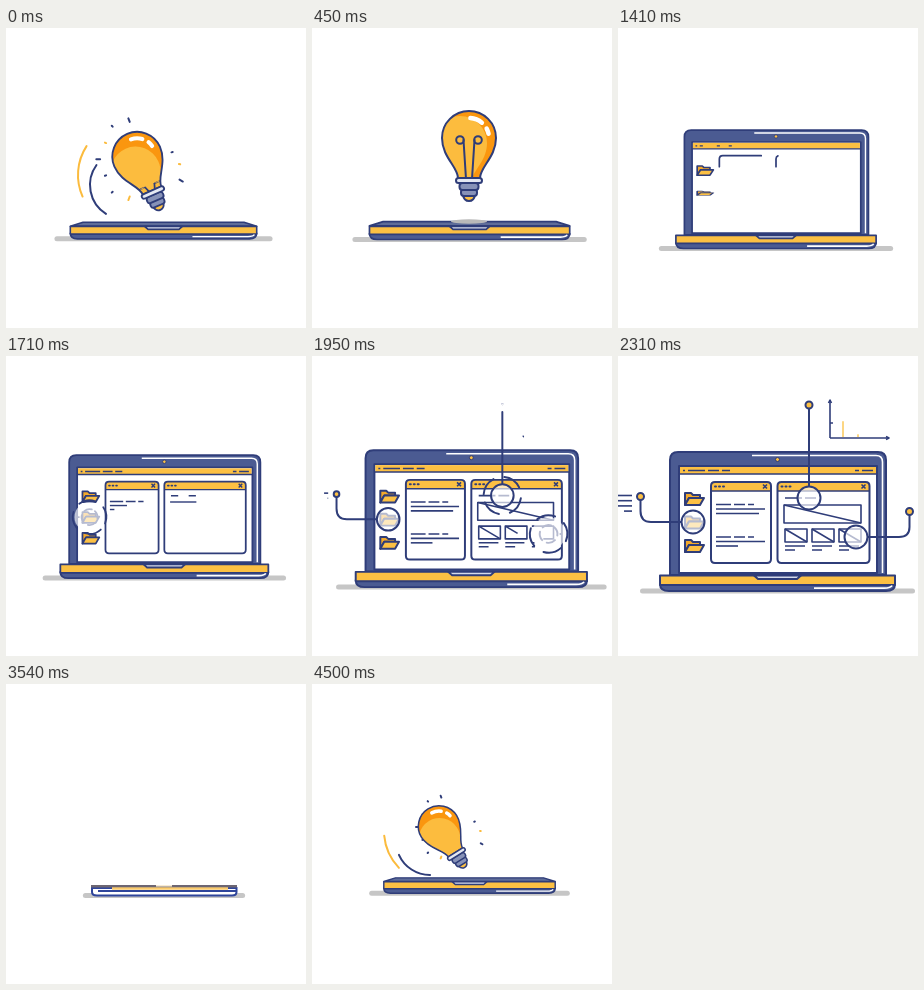
Recreate the animation shown at these times as an HTML page. Size 300 px wide and 300 px high, loop 4.53 s.

```html
<!DOCTYPE html>
<html lang="en">
<head>
<meta charset="utf-8">
<title>Idea to laptop</title>
<style>
html, body { margin: 0; width: 100%; height: 100%; overflow: hidden; background: #fff; }
svg { display: block; width: 100vw; height: 100vh; }
.ln { fill: none; stroke: #2f3d79; stroke-width: 2; stroke-linecap: round; stroke-linejoin: round; }
.box { stroke: #2f3d79; stroke-width: 2; stroke-linejoin: round; }
.thin { stroke-width: 1.6; stroke-linecap: butt; }
.gold { stroke: #fbbb3d; }
.y { fill: #fcc043; }
.n { fill: #4b5b92; }
.w { fill: #fff; }
</style>
</head>
<body>
<svg id="stage" viewBox="0 0 300 300">
  <defs>
    <path id="glass" d="M-11 40C-11 29-27 19-27 0A27 27 0 0 1 27 0C27 19 11 29 11 40Z"/>
    <clipPath id="glassClip"><use href="#glass"/></clipPath>
    <clipPath id="aboveBase"><rect width="300" height="205"/></clipPath>
    <g id="folder">
      <path class="box" fill="#f3a92b" d="M1 13V1H7L9 3H16V6H5Z"/>
      <path class="box y" d="M1 13L5 6H20L16 13Z"/>
    </g>
  </defs>
  <rect id="floor" height="5" rx="2.5" fill="#c6c6c6"/>
  <g id="laptop">
    <g id="lid">
      <path class="box n" d="M52 219V104Q52 96 60 96H260Q268 96 268 104V219Z"/>
      <path d="M134 99.5H258Q264.5 99.5 264.5 106V217" fill="none" stroke="#fff" stroke-width="1.6"/>
      <rect class="box w" x="61" y="110" width="198" height="107"/>
      <circle class="box y" cx="159.5" cy="103.5" r="2" style="stroke-width:1"/>
      <g id="screen">
        <rect class="y" x="62" y="111" width="196" height="7"/>
        <path class="ln thin" d="M61 118H259"/>
      </g>
    </g>
    <path id="flap" class="box w" d="M42 215H277L266 220H53Z"/>
    <path id="cover" class="box" fill="#5f6d99" d="M42 219L58 214H261L277 219Z"/>
    <g id="base">
      <path class="box n" d="M42 228H277Q277 235 268 235H51Q42 235 42 228Z"/>
      <path class="box y" d="M42 219.5H277V229H42Z"/>
      <path class="box" fill="#d5daea" d="M136 219.5H183L179 223H140Z"/>
      <path d="M196 232.2H266Q273 232 274 229.5" fill="none" stroke="#fff" stroke-width="1.8"/>
    </g>
    <g id="notes"></g>
  </g>
  <g id="flat">
    <path d="M86 204V208Q86 211.5 91 211.5H226Q230.5 211.5 230.5 208V204Z" fill="#fff" stroke="#2f459b" stroke-width="2"/>
    <path d="M92 207H230" stroke="#2f459b" stroke-width="2"/>
    <path d="M85 202.3H231" stroke="#6d6672" stroke-width="2.4"/>
    <path d="M106 204.5H222" stroke="#fbcb6b" stroke-width="2.6"/>
    <path d="M150 201.8H166" stroke="#fff3d8" stroke-width="1.5"/>
  </g>
  <ellipse id="shade" cx="157" cy="193.5" rx="18" ry="2.2" fill="#b9b9b9"/>
  <g id="burst"></g>
  <g clip-path="url(#aboveBase)">
    <g id="bulb">
      <g clip-path="url(#glassClip)">
        <use href="#glass" fill="#fa960f"/>
        <use id="glow" href="#glass" fill="#fcbc3e"/>
        <g id="wire" class="ln">
          <path d="M-3 41L-5.500 2M3 41L5.500 2"/>
          <circle cx="-9" cy="2" r="3.800"/><circle cx="9" cy="2" r="3.800"/>
        </g>
        <path id="shine" fill="none" stroke="#fff" stroke-width="4.500" stroke-linecap="round"/>
      </g>
      <use href="#glass" class="ln"/>
      <path class="box y" d="M-6 57H6Q5 63 0 63T-6 57Z"/>
      <rect class="box" fill="#8792b8" x="-8" y="51" width="16" height="7" rx="3"/>
      <rect class="box" fill="#8792b8" x="-9.500" y="45" width="19" height="7" rx="3"/>
      <rect class="box" fill="#e4e8f2" x="-13" y="40" width="26" height="5" rx="2.500"/>
    </g>
  </g>
</svg>
<script>
const LOOP = 4530, POP = 4350, STEP = 30, RETRACT = 2760;
const $ = id => document.getElementById(id);
const clamp = x => Math.max(0, Math.min(1, x));
const mix = (a, b, p) => a + (b - a) * p;

// Eased 0..1 between two times
function ramp(t, from, to) {
  const x = clamp((t - from) / (to - from));
  return x * x * (3 - 2 * x);
}
// Rises and returns to zero between two times
const bump = (t, from, to) => Math.sin(Math.PI * clamp((t - from) / (to - from)));

function set(node, attrs) {
  for (const k in attrs) node.setAttribute(k, attrs[k]);
  return node;
}
function add(parent, tag, attrs) {
  const node = document.createElementNS('http://www.w3.org/2000/svg', tag);
  parent.appendChild(node);
  return set(node, attrs);
}
const show = (node, on) => node.style.display = on ? '' : 'none';

function polar(cx, cy, r, deg) {
  const a = deg * Math.PI / 180;
  return [cx + r * Math.cos(a), cy + r * Math.sin(a)];
}
const arc = (cx, cy, r, a, b) =>
  `M${polar(cx, cy, r, a)}A${r} ${r} 0 ${b - a > 180 ? 1 : 0} 1 ${polar(cx, cy, r, b)}`;

// Lines that draw themselves; those outside the screen also retract
const strokes = [];
function stroke(parent, d, start, time, cls = '') {
  const node = add(parent, 'path', { class: 'ln ' + cls, d, pathLength: 1 });
  strokes.push({ node, start, end: start + time, retracts: parent === notes });
}
function drawStrokes(t) {
  for (const s of strokes) {
    const p = ramp(t, s.start, s.end) * (s.retracts ? 1 - ramp(t, RETRACT, RETRACT + 150) : 1);
    show(s.node, p > 0);
    set(s.node, { 'stroke-dasharray': p + ' 2' });
  }
}
// A row of dashes with even gaps
function dashes(x, y, ...widths) {
  return widths.map(w => {
    const d = `M${x} ${y}h${w}`;
    x += w + 3;
    return d;
  }).join('');
}

const screen = $('screen'), notes = $('notes');

stroke(screen, dashes(65, 114.500, 2, 17, 11, 8), 1360, 260, 'thin');
stroke(screen, dashes(237, 114.500, 4, 11), 1500, 180, 'thin');

const folders = [0, 1, 2].map(i => ({
  y: 149 + 23.500 * i, start: 1290 + 55 * i,
  node: add(screen, 'use', { href: '#folder' })
}));

const heads = [];
function makeWindow(x, w, start) {
  const r = x + w, top = `V130q0 -4 4 -4H${r - 4}q4 0 4 4`;
  heads.push({ node: add(screen, 'path', { class: 'y', d: `M${x} 135${top}V135Z` }), start: start + 170 });
  stroke(screen, `M${x} 139${top}V203q0 4 -4 4H${x + 4}q-4 0 -4 -4V139`, start, 330);
  stroke(screen, `M${x} 135H${r}`, start + 170, 160, 'thin');
  stroke(screen, dashes(x + 4, 130.500, 1, 1, 1), start + 200, 120);
  stroke(screen, `M${r - 8} 128.500l4 4m0 -4l-4 4`, start + 240, 100, 'thin');
}
makeWindow(93, 60, 1310);
makeWindow(159.500, 92, 1370);

for (const i of [0, 1]) {
  const y = 148.500 + 32.500 * i, start = 1620 + 90 * i;
  stroke(screen, dashes(98, y, 15, 11, 6), start, 140, 'thin');
  stroke(screen, dashes(98, y + 4.500, 49), start + 30, 140, 'thin');
  stroke(screen, dashes(98, y + 9, 43 - 21 * i), start + 60, 140, 'thin');
}
stroke(screen, dashes(167, 142, 17, 11), 1660, 140, 'thin');
stroke(screen, 'M166 149H243V167H166Z', 1660, 200, 'thin');
stroke(screen, 'M166 149L243 167', 1770, 150, 'thin');
for (let i = 0; i < 3; i++) {
  const x = 167 + 27 * i, start = 1740 + 60 * i;
  stroke(screen, `M${x} 173h22v13h-22z`, start, 150, 'thin');
  stroke(screen, `M${x} 173l22 13`, start + 90, 110, 'thin');
  stroke(screen, dashes(x, 190, 20) + dashes(x, 194, 10), start + 60, 150, 'thin');
}

// Magnifiers with leader lines ending in a knob
function makeLens(x, y, start, leader, knobX, knobY) {
  stroke(notes, leader, start + 50, 220);
  const circle = (cls, cx, cy) => add(notes, 'circle', { class: cls, cx, cy });
  return {
    x, y, start,
    rings: [19, 9].map(r => set(circle('ln', x, y), { r, 'stroke-dasharray': `${r} ${r * .6}` })),
    disc: set(circle('box w', x, y), { 'fill-opacity': .65 }),
    knob: circle('box y', knobX, knobY)
  };
}
const lenses = [
  makeLens(75, 166, 1650, 'M63 166H33Q22.500 166 22.500 155V141', 22.500, 140.500),
  makeLens(191, 142, 1720, 'M191 130V50', 191, 49),
  makeLens(238, 181, 1890, 'M250 181H281Q291.500 181 291.500 171V156', 291.500, 155.500)
];

// Side paragraph and chart
for (let i = 0; i < 4; i++) stroke(notes, `M14 ${139.500 + 5.200 * i}H${i < 3 ? -2 : 6}`, 1890 + 40 * i, 180, 'thin');
stroke(notes, 'M212 82V45', 1930, 220, 'thin');
stroke(notes, 'M212 82H270', 1930, 250, 'thin');
stroke(notes, 'M210.500 47l1.500 -3l1.500 3M268 80.500l3 1.500l-3 1.500M212 67h3', 2130, 90, 'thin');
const bars = [0, 1, 2].map(i => ({
  x: 225 + 15 * i, h: 26 * Math.cos(i) ** 2 + 6 * i, start: 2190 + 60 * i,
  node: add(notes, 'rect', { fill: '#fcc95b' })
}));

// Sparks: seven fan out on the left of the bulb, three on the right
const sparks = Array.from({ length: 10 }, (_, i) => {
  const j = i - 7;
  const angle = j < 0 ? 111 + 23 * i : -14 + 22 * j;
  const [x, y] = polar(138, 131, j < 0 ? 42 + 4 * (i % 2) : 29 + 7 * j, angle);
  const node = add($('burst'), 'path', { class: 'ln ' + (i % 4 ? '' : 'gold') });
  return { x, y, angle, len: i % 3 ? 1.500 : 4.500, node };
});
// Arcs sweeping around the bulb; angles and speeds of both ends
const swooshes = [
  { circle: [125, 147, 53], tail: 156, head: 213, slow: .67, fast: 1.270, cls: 'ln gold' },
  { circle: [118, 157, 34], tail: 122, head: 216, slow: 1.070, fast: 2, cls: 'ln' }
];
for (const s of swooshes) s.node = add($('burst'), 'path', { class: s.cls });

set($('shine'), { d: arc(0, 0, 20, -86, -50) + arc(0, 0, 20, -28, -12) });

function drawLaptop(t) {
  const grow = ramp(t, -106, 52), zoom = ramp(t, 1560, 2050), drop = ramp(t, 1600, 2130);
  const shrink = ramp(t, 2900, 3240), rise = ramp(t, 4080, POP);
  const s = .62 + .232 * grow + .148 * zoom - .41 * shrink + .03 * rise;
  const y = 209 + 2.500 * ramp(t, -40, 20) + 4.500 * ramp(t, 540, 870) + 4.500 * ramp(t, 1020, 1080)
    + 14.500 * drop - 23.500 * shrink - 2.500 * rise;
  const x = 157.500 + .5 * ramp(t, 300, 870) + 1.500 * (zoom - shrink) - .5 * rise;
  const hop = -10 * bump(t, 4080, POP);
  const flat = t >= 3240 && t < 3810;

  set($('floor'), { x: x - 137.500 * s, y: y - 2.500, width: 275 * s });
  set($('laptop'), { transform: `translate(${x} ${y + hop}) scale(${s}) translate(-159.500 -235)` });
  show($('laptop'), !flat);
  show($('flat'), flat);

  const open = .08 * ramp(t, 780, 840) + .92 * ramp(t, 1020, 1290) - ramp(t, 2940, 3180);
  show($('lid'), open > .1);
  show($('flap'), open > .001 && open <= .1);
  show($('cover'), open <= .001);
  set($('lid'), { transform: `translate(159.500 219) scale(${1 + .075 * (1 - open)} ${open}) translate(-159.500 -219)` });
}

function drawScreen(t) {
  for (const f of folders) {
    const p = ramp(t, f.start, f.start + 150);
    show(f.node, p > 0);
    set(f.node, { transform: `translate(66 ${f.y}) scale(1 ${p}) translate(0 -13)` });
  }
  for (const h of heads) set(h.node, { opacity: ramp(t, h.start, h.start + 120) });
  for (const b of bars) {
    const h = b.h * ramp(t, b.start, b.start + 210) * (1 - ramp(t, RETRACT, RETRACT + 120));
    const width = mix(1.500, 6, ramp(t, 2340, 2520));
    set(b.node, { x: b.x - width / 2, y: 81 - h, width, height: h });
  }
  drawStrokes(t);
  lenses.forEach(l => drawLens(l, t - l.start, t));
}

function drawLens(l, age, t) {
  const settle = ramp(age, 60, 190), r = mix(17, 11.500, settle) * (1 - ramp(t, RETRACT + 90, RETRACT + 200));
  const knob = 3.500 * ramp(age, 220, 330) * (1 - ramp(t, RETRACT, RETRACT + 90));
  show(l.disc, age > 0 && r > 0);
  show(l.knob, knob > 0);
  set(l.disc, { r, 'stroke-opacity': settle });
  set(l.knob, { r: knob });
  l.rings.forEach((ring, i) => {
    show(ring, age > 0 && age < (i ? 120 : 250));
    set(ring, { transform: `rotate(${age * (i ? -.8 : .8)} ${l.x} ${l.y})` });
  });
}

function drawBulb(t) {
  const on = t > -150 && t < 1100;
  show($('bulb'), on);
  show($('shade'), on);
  set($('shade'), { opacity: ramp(t, 240, 420) * (1 - ramp(t, 960, 1050)) });
  const s = ramp(t, -177, 37), fall = clamp((t - 930) / 165);
  const x = 152 + 5 * ramp(t, -60, 60);
  const y = 191 - 10 * s - 16 * bump(t, 0, 540) + 5.500 * ramp(t, 540, 870) + 75 * fall * fall;
  const tilt = -36 * (1 - ramp(t, -62, 96));
  const turn = ramp(t, 0, 240), wire = ramp(t, -30, 80);
  set($('bulb'), { transform: `translate(${x} ${y}) rotate(${tilt}) scale(${s}) translate(0 -63)` });
  set($('glow'), { transform: `translate(${mix(-8, -9, turn)} ${mix(14, 5, turn)})` });
  set($('wire'), { transform: `translate(0 41) scale(1 ${wire}) translate(0 -41)` });
  show($('wire'), wire > 0);
}

function drawBurst(t) {
  show($('burst'), t > -80 && t < 390);
  const reach = 1.300 * (1 - Math.exp(-(t + 80) / 55));
  const size = ramp(t, -75, 25) * (1 - ramp(t, 150, 390));
  for (const p of sparks) {
    const h = p.len * size / 2;
    set(p.node, {
      d: `M${-h} 0H${h}`, 'stroke-width': 2 * Math.sqrt(size),
      transform: `translate(${mix(150, p.x, reach)} ${mix(185, p.y, reach)}) rotate(${p.angle})`
    });
  }
  for (const s of swooshes) {
    const tail = s.tail + s.slow * t + .005 * Math.max(0, t) ** 2;
    const head = Math.min(262, s.head + s.fast * t);
    show(s.node, tail < head);
    set(s.node, { d: arc(...s.circle, tail, head) });
  }
}

function render(ms) {
  let t = Math.floor((ms % LOOP) / STEP) * STEP;
  if (t >= POP) t -= LOOP;
  drawLaptop(t);
  drawScreen(t);
  drawBulb(t);
  drawBurst(t);
}

const begin = performance.now();
function tick() {
  render(performance.now() - begin);
  requestAnimationFrame(tick);
}
tick();
</script>
</body>
</html>
```
